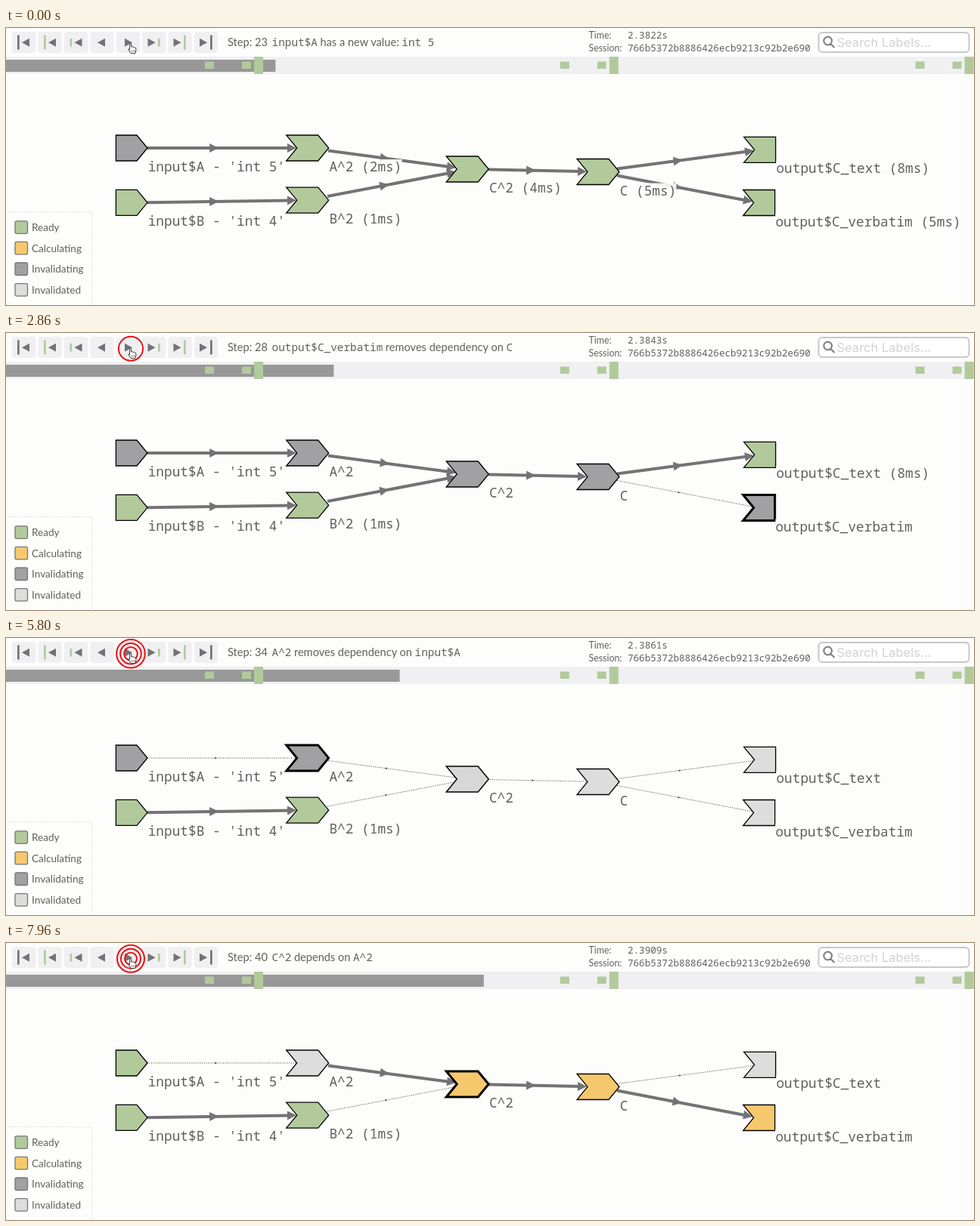
Animation of 1280x367 px, one loop 8000 ms. Source, as an HTML page:

```html
<!DOCTYPE html>
<html lang="en">
<head>
<meta charset="utf-8">
<title>Reactive graph player</title>
<style>
  html, body { margin: 0; width: 100%; height: 100%; overflow: hidden; background: #fdfdfc; }
  svg { display: block; width: 1280px; height: 367px; font-family: Lato, "Open Sans", sans-serif; fill: #606060; }
  .mono { font-family: "Noto Sans Mono", "DejaVu Sans Mono", monospace; }
  text { white-space: pre; }
</style>
</head>
<body>
<svg id="stage" viewBox="0 0 1280 367"></svg>
<script>
const LOOP = 8000;
const STEP_WIDTH = 16.2;
const FIRST_STEP = 23;
const GREEN = "#b2ca9b", AMBER = "#f6c86d", GRAY = "#a1a1a4", PALE = "#dddddd";
const DARK = "#737375", TRACK = "#f0f0f2", BAR = "#989898";
const CHAR = 10.68;

const stage = document.getElementById("stage");

function add(tag, attrs = {}, parent = stage, content = "") {
  const el = document.createElementNS("http://www.w3.org/2000/svg", tag);
  set(el, attrs);
  if (content) el.textContent = content;
  parent.append(el);
  return el;
}
function set(el, attrs) {
  for (const key in attrs) el.setAttribute(key, attrs[key]);
}
const rect = (x, y, width, height, fill, extra = {}) => add("rect", { x, y, width, height, fill, ...extra });
const label = (x, y, size, content, extra = {}) => add("text", { x, y, "font-size": size, ...extra }, stage, content);

// Nodes: left edge, centre line, width, notch depth, tip length
const nodes = {
  inA: { x: 145.4, y: 159, w: 41.6, notch: 0, tip: 14, name: "input$A - 'int 5'" },
  inB: { x: 145.4, y: 231.3, w: 41.6, notch: 0, tip: 14, name: "input$B - 'int 4'" },
  A2: { x: 370.7, y: 159, w: 56, notch: 14, tip: 14, name: "A^2", ms: 2 },
  B2: { x: 370.7, y: 228.2, w: 56, notch: 14, tip: 14, name: "B^2", ms: 1 },
  C2: { x: 582.2, y: 187, w: 56, notch: 14, tip: 14, name: "C^2", ms: 4 },
  C: { x: 755, y: 190.5, w: 56, notch: 14, tip: 14, name: "C", ms: 5 },
  text: { x: 975.7, y: 161.3, w: 42, notch: 14, tip: 0, name: "output$C_text", ms: 8 },
  verb: { x: 974.7, y: 231.5, w: 42, notch: 14, tip: 0, name: "output$C_verbatim", ms: 5 }
};
const edges = {
  "inA-A2": [187, 159, 384, 159],
  "inB-B2": [187, 231.3, 384, 228.3],
  "A2-C2": [426, 162.5, 595, 185],
  "B2-C2": [425, 223, 595, 190.5],
  "C2-C": [638, 187.5, 768, 190.2],
  "C-text": [808, 186.5, 989, 162.5],
  "C-verb": [808, 195.5, 987, 230]
};

// Each step: start, clock, message (code in backticks), highlighted node, new fills, cut edge, linked edge
const steps = [
  { at: 0, clock: 22, msg: "`input$A` has a new value: `int 5`", fill: { inA: GRAY } },
  { at: 530, clock: 24, msg: "`A^2` is invalidating", hot: "A2", fill: { A2: GRAY } },
  { at: 1130, clock: 26, msg: "`C^2` is invalidating", hot: "C2", fill: { C2: GRAY } },
  { at: 1610, clock: 29, msg: "`C` is invalidating", hot: "C", fill: { C: GRAY } },
  { at: 2090, clock: 34, msg: "`output$C_verbatim` is invalidating", hot: "verb", fill: { verb: GRAY } },
  { at: 2710, clock: 43, msg: "`output$C_verbatim` removes dependency on `C`", hot: "verb", cut: "C-verb" },
  { at: 3250, clock: 50, msg: "`output$C_text` is invalidating", hot: "text", fill: { verb: PALE, text: GRAY } },
  { at: 3770, clock: 54, msg: "`output$C_text` removes dependency on `C`", hot: "text", cut: "C-text" },
  { at: 4230, clock: 56, msg: "`C` removes dependency on `C^2`", hot: "C", fill: { text: PALE }, cut: "C2-C" },
  { at: 4860, clock: 58, msg: "`C^2` removes dependency on `A^2`", hot: "C2", fill: { C: PALE }, cut: "A2-C2" },
  { at: 5200, clock: 59, msg: "`C^2` removes dependency on `B^2`", hot: "C2", cut: "B2-C2" },
  { at: 5720, clock: 61, msg: "`A^2` removes dependency on `input$A`", hot: "A2", fill: { C2: PALE }, cut: "inA-A2" },
  { at: 6100, clock: 81, msg: "`output$C_verbatim` started calculating", hot: "verb", fill: { inA: GREEN, A2: PALE, verb: AMBER } },
  { at: 6350, clock: 93, msg: "`output$C_verbatim` depends on `C`", hot: "verb", link: "C-verb" },
  { at: 6600, clock: 99, msg: "`C` started calculating", hot: "C", fill: { C: AMBER } },
  { at: 7080, clock: 102, msg: "`C` depends on `C^2`", hot: "C", link: "C2-C" },
  { at: 7330, clock: 106, msg: "`C^2` started calculating", hot: "C2", fill: { C2: AMBER } },
  { at: 7580, clock: 109, msg: "`C^2` depends on `A^2`", hot: "C2", link: "A2-C2" }
];
const clicks = [500, 1150, 1600, 2060, 2720, 3250, 3770, 4230, 4860, 5110, 5360,
  6080, 6330, 6580, 7060, 7310, 7560];

let state = {
  fill: Object.fromEntries(Object.keys(nodes).map(id => [id, GREEN])),
  cut: new Set()
};
for (const step of steps) {
  const cut = new Set(state.cut);
  if (step.cut) cut.add(step.cut);
  if (step.link) cut.delete(step.link);
  state = step.state = { fill: { ...state.fill, ...step.fill }, cut, hot: step.hot };
}

// Toolbar
const triangle = (x, dir) => add("path", { d: `M${x} 19.3l${-10 * dir}-5.5v11z`, fill: DARK });
const mark = (x, tall, color) => rect(x, tall ? 9.5 : 14, 2.7, tall ? 19 : 10.5, color);
const marks = [[15, true, DARK], [50, true, GREEN], [84.5, false, GREEN], null,
  null, [201, false, GREEN], [235, true, GREEN], [270, true, DARK]];
const tips = [21, 56, 90.5, 121, 167, 197.5, 231.5, 266];
tips.forEach((tip, i) => {
  rect(8 + 34.4 * i, 5, 31.5, 28, TRACK, { rx: 4 });
  triangle(tip, i < 4 ? -1 : 1);
  if (marks[i]) mark(...marks[i]);
});
const stepNumber = label(293, 24, 14.6, "");
const message = label(351.5, 24, 14.6, "");
label(770.5, 14.2, 12.4, "Time:");
label(770.5, 31.2, 12.4, "Session:");
const clock = label(822, 14.2, 12.6, "", { class: "mono" });
label(822, 31.2, 12.6, "766b5372b8886426ecb9213c92b2e690", { class: "mono" });
rect(1074.5, 6, 199, 26, "#fff", { rx: 5, stroke: "#c8c8c8", "stroke-width": 2 });
add("path", { d: "M1092 17a5.3 5.3 0 1 1-10.6 0a5.3 5.3 0 1 1 10.6 0M1090.5 21l5 5", fill: "none", stroke: "#858585", "stroke-width": 2.2 });
label(1098.5, 25.3, 16.5, "Search Labels...", { style: "font-family:Inter,sans-serif", fill: "#d2d2d2" });

// Timeline
rect(0, 38, 1280, 23, TRACK);
const progress = rect(0, 42, 0, 16, BAR);
for (let i = 0; i < 3; i++) {
  const x = 29 * STEP_WIDTH * i;
  rect(263 + x, 44.5, 12, 9.5, GREEN);
  rect(312 + x, 44.5, 12, 9.5, GREEN);
  rect(328 + x, 38, 12, 23, GREEN);
}

// Graph
function makeEdge([x1, y1, x2, y2]) {
  const length = Math.hypot(x2 - x1, y2 - y1);
  const angle = Math.atan2(y2 - y1, x2 - x1) * 180 / Math.PI;
  const group = add("g", { transform: `translate(${x1} ${y1}) rotate(${angle})` });
  const midTip = length * 0.478;
  const thick = add("g", {}, group);
  add("path", { d: `M0 0H${length - 8}`, stroke: DARK, "stroke-width": 4 }, thick);
  for (const tip of [midTip, length])
    add("path", { d: `M${tip} 0l-12-6v12z`, fill: DARK }, thick);
  const thin = add("g", {}, group);
  add("path", { d: `M0 0H${length}`, stroke: "#444", "stroke-width": 1, "stroke-dasharray": "1 1.5" }, thin);
  add("path", { d: `M${midTip - 2} 0l-3-1.3v2.6z`, fill: "#444" }, thin);
  return { thick, thin };
}
function makeNode({ x, y, w, notch, tip }) {
  const right = x + w;
  const d = `M${x} ${y - 17}H${right - tip}L${right} ${y}L${right - tip} ${y + 17}H${x}L${x + notch} ${y}z`;
  return add("path", { d, stroke: "#000" });
}
const edgeViews = Object.entries(edges).map(([id, line]) => ({ id, ...makeEdge(line) }));
const nodeViews = Object.entries(nodes).map(([id, node]) => {
  const shape = makeNode(node);
  const x = node.x + node.w + 0.7;
  const back = rect(x, node.y + 15, 0, 20, "#fdfdfc", { "fill-opacity": 0.9 });
  const caption = label(x, node.y + 31, 17.8, "", { class: "mono" });
  return { id, node, shape, back, caption };
});

// Legend
add("path", { d: "M0 243.5H113.5V367", fill: "none", stroke: "#dcdcdc", "stroke-dasharray": "1.5 1.5" });
[["Ready", GREEN], ["Calculating", AMBER], ["Invalidating", GRAY], ["Invalidated", PALE]].forEach(([name, color], i) => {
  const y = 255.8 + 27.6 * i;
  rect(12, y, 16.5, 16.5, color, { rx: 2, stroke: "#777", "stroke-width": 1.3 });
  label(34, y + 13.3, 13.6, name);
});

// Pointer and click rings
const rings = clicks.map(at => ({
  at,
  view: add("circle", { cx: 165, cy: 20.7, fill: "none", stroke: "#ea1218", "stroke-width": 2 })
}));
add("path", {
  d: "M163.6 28.5V22q0-1.6 1.1-1.6t1.1 1.6v3q2-.7 2.4.5q1.6-.4 2 .6q1.7-.2 1.7 1.2v2.4l-1.3 4h-5l-3.7-5q-.5-1.5 1.7-.2z",
  fill: "#fff", stroke: "#333", "stroke-width": 1
});
add("path", { d: "M166.3 29.3v2.5M168.2 29.3v2.5M170 29.3v2.5", stroke: "#555", "stroke-width": 0.7 });

const clamp = v => Math.max(0, Math.min(1, v));
const easeInOut = p => p < 0.5 ? 4 * p ** 3 : 1 - 4 * (1 - p) ** 3;
const mix = (a, b, p) => a + (b - a) * p;
const channels = color => [1, 3, 5].map(i => parseInt(color.slice(i, i + 2), 16));
function mixColor(from, to, p) {
  const end = channels(to);
  return `rgb(${channels(from).map((c, i) => Math.round(mix(c, end[i], p)))})`;
}

function writeMessage(text) {
  message.textContent = "";
  text.split("`").forEach((part, i) => {
    if (!part) return;
    const code = i % 2 === 1;
    const attrs = { dx: i > 1 ? 3.5 : 0 };
    if (code) Object.assign(attrs, { class: "mono", "font-size": 14.4 });
    add("tspan", attrs, message, part.trim());
  });
}

let shown = -1;
function showStep(index) {
  if (index === shown) return;
  shown = index;
  const { state, msg, clock: ticks } = steps[index];
  stepNumber.textContent = `Step: ${FIRST_STEP + index}`;
  clock.textContent = `${(2.38 + ticks / 10000).toFixed(4)}s`;
  writeMessage(msg);
  for (const { id, thick, thin } of edgeViews) {
    const cut = state.cut.has(id);
    set(thick, { display: cut ? "none" : "inline" });
    set(thin, { display: cut ? "inline" : "none" });
  }
  for (const { id, node, back, caption } of nodeViews) {
    const timed = node.ms && state.fill[id] === GREEN;
    caption.textContent = node.name + (timed ? ` (${node.ms}ms)` : "");
    set(back, { width: caption.textContent.length * CHAR });
  }
}

function render(t) {
  const index = steps.findLastIndex(step => step.at <= t);
  const before = steps[Math.max(0, index - 1)].state;
  const now = steps[index].state;
  const age = t - steps[index].at;
  showStep(index);

  const fade = clamp(age / 90);
  for (const { id, shape } of nodeViews)
    set(shape, {
      fill: mixColor(before.fill[id], now.fill[id], fade),
      "stroke-width": mix(before.hot === id ? 3 : 1.3, now.hot === id ? 3 : 1.3, fade)
    });

  const moved = index ? easeInOut(clamp(age / 250)) - 1 : 0;
  set(progress, { width: (FIRST_STEP - 1 + index + moved) * STEP_WIDTH });

  // A ring becomes visible once it has grown past the pointer
  for (const { at, view } of rings) {
    const life = (t - at) / 1000;
    const alive = life > 0.2 && life < 0.98;
    set(view, { r: alive ? 20 * life : 0, display: alive ? "inline" : "none" });
  }
}

function tick() {
  render(performance.now() % LOOP);
  requestAnimationFrame(tick);
}
tick();
</script>
</body>
</html>
```
